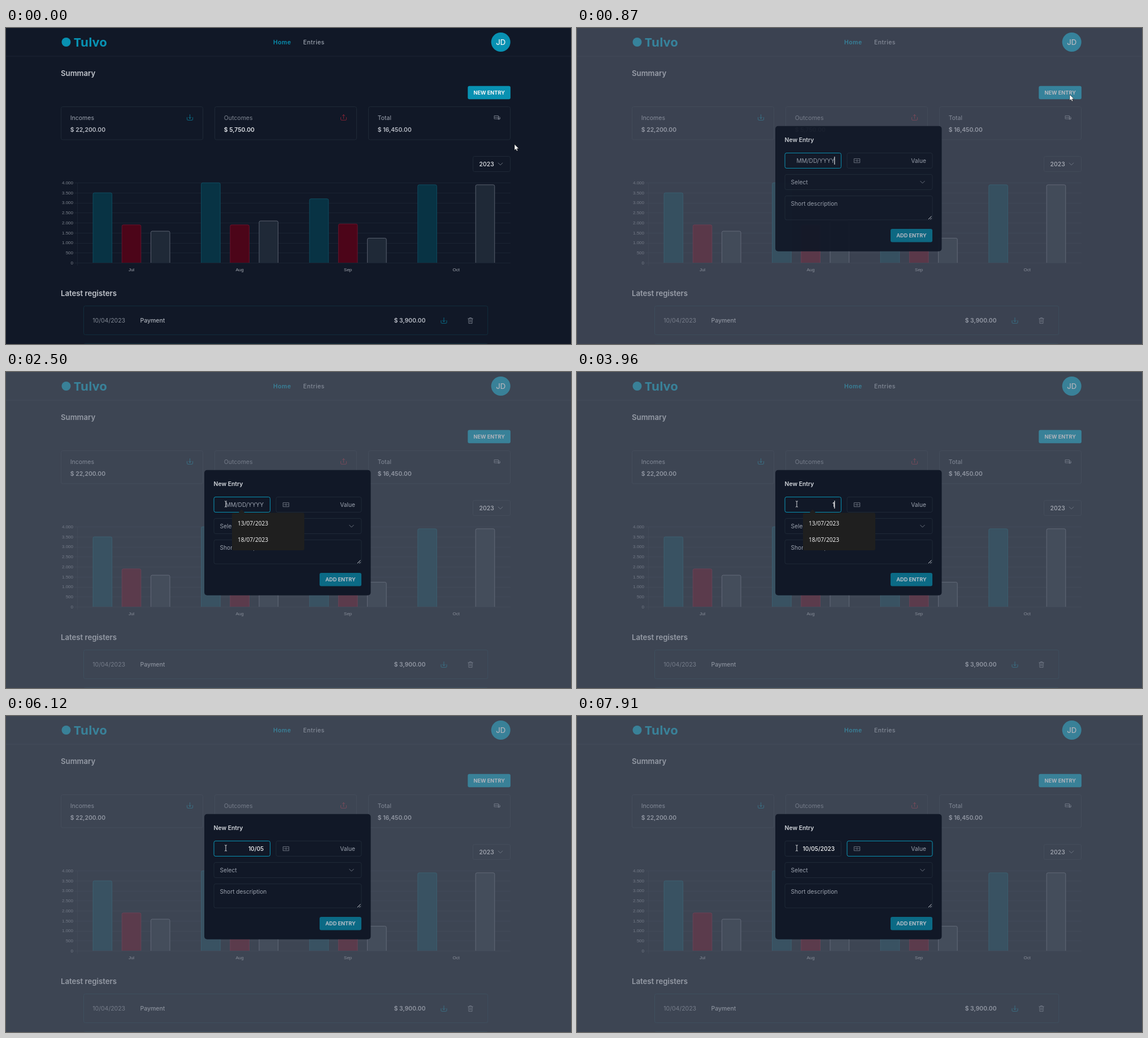
These frames come from a looping animation (1000 by 560 pixels, 8 s). An HTML page:

```html
<!DOCTYPE html>
<html lang="en">
<head>
<meta charset="utf-8">
<title>Finance dashboard</title>
<style>
  html, body { margin: 0; width: 100%; height: 100%; overflow: hidden; background: #111827; }
  svg { display: block; width: 100%; height: 100%; }
  text { font: 400 10.5px Inter, sans-serif; fill: #9ca3af; white-space: pre; }
  .medium { font-weight: 500; }
  .strong { font-weight: 600; font-size: 10.4px; fill: #b9bdc6; }
  .heading { font-weight: 600; font-size: 13.2px; fill: #c0c4cb; }
  .brand { font: 700 22px "Noto Sans", sans-serif; fill: #0891b2; }
  .nav { font-size: 10.4px; letter-spacing: .5px; font-weight: 500; }
  .active { font-weight: 600; fill: #0891b2; }
  .button { font-weight: 700; font-size: 9.2px; fill: #f3f4f6; }
  .initials { font-weight: 500; font-size: 13.2px; fill: #f3f4f6; }
  .field { font-size: 10.2px; }
  .axis { font: 8px "Liberation Sans", Arial, sans-serif; fill: #7b818c; }
  .month { fill: #a4a9b2; }
  .option { font: 10.2px "Noto Sans", sans-serif; fill: #f0f0f0; }
  .end { text-anchor: end; }
  .middle { text-anchor: middle; }
  .box { fill: none; stroke: #1f2937; }
  .row { fill: none; stroke: #122e3d; }
  .icon { fill: none; stroke: #8b929e; stroke-width: .75; stroke-linecap: round; stroke-linejoin: round; }
  .cyan { stroke: #0887a6; }
  .red { stroke: #a32638; }
  .focus { fill: none; stroke: #0891b2; }
</style>
</head>
<body>
<svg id="stage" viewBox="0 0 1000 560"></svg>
<script>
const LOOP = 8000;
const stage = document.getElementById('stage');

const text = (x, y, str, cls = '', attrs = '') =>
  `<text x="${x}" y="${y}" class="${cls}" ${attrs}>${str}</text>`;
const box = (x, y, w, h, attrs = 'class="box"') =>
  `<rect x="${x}" y="${y}" width="${w}" height="${h}" rx="3" ${attrs}/>`;
const icon = (x, y, d, cls = '') =>
  `<path transform="translate(${x} ${y})" class="icon ${cls}" d="${d}"/>`;
const line = (x1, y1, x2, y2, color) =>
  `<path d="M${x1} ${y1}L${x2} ${y2}" stroke="${color}"/>`;

const TRAY = 'M-5 0v3.3q0 1.5 1.5 1.5h7q1.5 0 1.5 -1.5v-3.3';
const DOWN = TRAY + 'M0 -5v7m-2.3 -2.3l2.3 2.3 2.3 -2.3';
const UP = TRAY + 'M0 2v-7m-2.3 2.3l2.3 -2.3 2.3 2.3';
const TRASH = 'M-4.2 -3.5h8.4M-1.5 -3.5v-1.5h3v1.5M-3.4 -3.5l.4 8.5h6l.4 -8.5M-1.1 -1.3v4M1.1 -1.3v4';
const CHEVRON = 'M-3.8 -1.9l3.8 3.8 3.8 -3.8';
const NOTE = 'M-5 -3.5h10v7h-10zM-1.3 0a1.3 1.3 0 1 0 2.6 0a1.3 1.3 0 1 0 -2.6 0M-3.4 -.4v.8M3.4 -.4v.8';
const COINS = 'M-5 -3h7v5.5h-7zM-5 -.2h7M2 -.8h1.5q1.5 0 1.5 1.6v1.7h-3M1.6 2.6a1.1 1.1 0 1 0 2.2 0a1.1 1.1 0 1 0 -2.2 0';

function card(x, label, amount, symbol, color, bright) {
  return box(x, 139.5, 251, 58.5) +
    text(x + 16.3, 162.5, label, '', bright ? 'style="fill:#7f8692"' : '') +
    text(x + 16.3, 183.5, amount, 'strong', bright ? 'style="fill:#dfe2e7"' : '') +
    icon(x + 228, 158.5, symbol, color);
}

function chart() {
  const yOf = value => 416 - value * 0.0355;
  let out = line(126.5, 274, 126.5, 421, '#1a2332');
  for (let value = 0; value <= 4000; value += 500) {
    const y = yOf(value);
    const label = value < 1000 ? value : (value / 1000).toFixed(3);
    out += line(121, Math.round(y) + .5, 893, Math.round(y) + .5, '#1a2332') +
      text(119, y + 2.9, label, 'axis end');
  }
  const colors = [['#083344', '#11566a'], ['#4c0519', '#741731'], ['#1f2937', '#6b7280']];
  const months = {
    Jul: [3500, 1900, 1585], Aug: [4000, 1900, 2095],
    Sep: [3200, 1945, 1235], Oct: [3900, 0, 3900]
  };
  Object.entries(months).forEach(([month, values], i) => {
    const left = 154 + i * 191.6;
    values.forEach((value, j) => {
      if (!value) return;
      const top = yOf(value) + .3;
      const [fill, stroke] = colors[j];
      out += `<path d="M${left + j * 51.2} 416V${top + 2.5}q0 -2.5 2.5 -2.5h28.6q2.5 0 2.5 2.5V416"
        fill="${fill}" stroke="${stroke}" stroke-width=".8"/>`;
    });
    out += text(left + 68, 430.5, month, 'axis month middle');
  });
  return out;
}

const page = `
  <rect width="1000" height="560" fill="#111827"/>
  ${line(0, 50, 1000, 50, '#1c2534')}
  <circle cx="106.5" cy="25" r="8" fill="#0891b2"/>
  ${text(120, 33, 'Tulvo', 'brand')}
  ${text(473, 29, 'Home', 'nav active')}
  ${text(526, 29, 'Entries', 'nav')}
  <circle cx="875.7" cy="25" r="17" fill="#0891b2"/>
  ${text(875.7, 29.8, 'JD', 'initials middle')}
  ${text(97, 85, 'Summary', 'heading')}
  ${box(817.3, 102.7, 75.6, 23.5, 'fill="#0891b2"')}
  ${text(855.2, 118, 'NEW ENTRY', 'button middle')}
  ${card(97.5, 'Incomes', '$ 22,200.00', DOWN, 'cyan')}
  ${card(369.5, 'Outcomes', '$ 5,750.00', UP, 'red', true)}
  ${card(641.5, 'Total', '$ 16,450.00', COINS)}
  ${box(826.5, 227.5, 66, 27)}
  ${text(837.5, 244.7, '2023', 'medium', 'style="fill:#e5e7eb"')}
  ${icon(875, 241, CHEVRON)}
  ${chart()}
  ${text(97, 475, 'Latest registers', 'heading')}
  ${box(137.5, 492.6, 715.2, 51, 'class="row"')}
  ${text(153.3, 522, '10/04/2023', '', 'style="fill:#828995"')}
  ${text(237.5, 522, 'Payment', 'medium', 'style="fill:#acb1ba"')}
  ${text(742.5, 522, '$ 3,900.00', 'strong end')}
  ${icon(775, 518.5, DOWN, 'cyan')}
  ${icon(822, 518.5, TRASH)}
  ${box(137.5, 559.3, 715.2, 51, 'class="row"')}`;

const modal = `
  <rect x="351" y="173.7" width="294.5" height="222" rx="5" fill="#111827"/>
  ${text(367.5, 201.7, 'New Entry', 'strong', 'style="fill:#d1d5db"')}
  ${box(368, 221.5, 99.5, 27)}
  ${box(478, 221.5, 151, 27)}
  ${box(368, 221.5, 99.5, 27, 'id="dateFocus" class="focus"')}
  ${box(478, 221.5, 151, 27, 'id="valueFocus" class="focus"')}
  ${text(456.2, 238.8, '', 'field end', 'id="date"')}
  <rect id="dateCaret" x="455.3" y="228" width="1.1" height="14" fill="#fff"/>
  ${icon(495.7, 235.2, NOTE)}
  ${text(618, 238.8, 'Value', 'field end')}
  <rect id="valueCaret" x="617" y="228" width="1" height="14" fill="#fff"/>
  ${box(368, 259.5, 261, 27)}
  ${text(378.5, 276.8, 'Select', 'field')}
  ${icon(611.5, 273.2, CHEVRON)}
  ${box(368, 297.5, 261, 42.5)}
  ${text(378.5, 314.8, 'Short description', 'field')}
  <path d="M622 339l5.5 -5.5M625.3 339l2.2 -2.2" stroke="#d1d5db"/>
  ${box(555, 356, 74, 23.5, 'fill="#0b6a85"')}
  ${text(592, 371, 'ADD ENTRY', 'button middle', 'style="fill:#b6bec8"')}
  <g id="options">
    <path d="M403 249.5h8.5l5.5 -6 5.5 6h2.5H525q3 0 3 3V313q0 3 -3 3H403q-3 0 -3 -3v-60.5q0 -3 3 -3z" fill="#1f1f1f"/>
    ${text(410, 271.5, '13/07/2023', 'option')}
    ${text(410, 301, '18/07/2023', 'option')}
  </g>`;

stage.innerHTML = `${page}
  <rect id="overlay" width="1000" height="560" fill="#6b7280"/>
  <g id="modal">${modal}</g>
  <path id="arrow" d="M0 0V10.6L2.4 8.4 4 12 5.8 11.2 4.2 7.8H7.6Z" fill="#fff" stroke="#000" stroke-width=".5"/>
  <path id="beam" d="M-2 -5.2Q0 -5.2 0 -4.2Q0 -5.2 2 -5.2M0 -4.5V4.5M-2 5.2Q0 5.2 0 4.2Q0 5.2 2 5.2" fill="none" stroke="#d6d8dc"/>`;

const ui = {};
stage.querySelectorAll('[id]').forEach(node => ui[node.id] = node);

// Progress that advances in equal jumps, the first at `start` and the last at `end`.
function steps(t, start, end, count) {
  if (t < start) return 0;
  return Math.min(1, (Math.floor((t - start) / (end - start) * (count - 1) + 1e-6) + 1) / count);
}
const smooth = p => p * p * (3 - 2 * p);
// Last entry whose time has passed.
const at = (t, list) => list.reduce((value, [time, next]) => t >= time ? next : value, list[0][1]);

// [start, end, jumps, x, y]
const moves = [
  [60, 390, 6, 861, 107],
  [660, 660, 1, 874, 115],
  [800, 800, 1, 872, 118],
  [1260, 2010, 12, 395, 235],
  [2090, 2170, 2, 380, 229],
  [2250, 2500, 4, 389, 234]
];
const typing = [
  [0, ''], [3960, '1'], [4100, '10'], [4580, '10/0'], [5590, '10/05'],
  [6190, '10/05/2'], [6390, '10/05/20'], [6460, '10/05/202'], [6720, '10/05/2023']
];
const caret = [
  [0, 1], [1380, 0], [1910, 1], [2440, 0], [2970, 1], [3500, 0], [3960, 1],
  [5130, 0], [5590, 1], [6120, 0], [6190, 1], [7250, 0]
];

function pointer(t) {
  let x = 900, y = 206;
  for (const [start, end, count, toX, toY] of moves) {
    if (t < start) break;
    const p = start === end ? 1 : smooth(steps(t, start, end, count));
    x += (toX - x) * p;
    y += (toY - y) * p;
  }
  return [x, y];
}

const show = (node, opacity) => node.setAttribute('opacity', opacity);

function render(t) {
  show(ui.overlay, at(t, [[0, 0], [865, .47], [930, .5]]));
  show(ui.modal, at(t, [[0, 0], [865, .94], [930, .98], [1000, 1]]));

  const typed = at(t, typing);
  ui.date.textContent = typed || 'MM/DD/YYYY';
  ui.date.style.fill = typed ? '#f9fafb' : '';
  ui.date.style.fontWeight = typed ? 500 : '';
  show(ui.dateCaret, at(t, caret));
  show(ui.valueCaret, at(t, [[0, 0], [7250, 1], [7910, 0]]));

  const focus = steps(t, 7250, 7380, 2);
  show(ui.dateFocus, 1 - focus);
  show(ui.valueFocus, focus);
  show(ui.options, steps(t, 2330, 2500, 3) - steps(t, 4100, 4320, 4));

  const [x, y] = pointer(t);
  const overInput = t > 1260 && x < 467 && y > 221;
  for (const node of [ui.arrow, ui.beam]) {
    node.setAttribute('transform', `translate(${x.toFixed(1)} ${y.toFixed(1)})`);
  }
  show(ui.arrow, overInput ? 0 : 1);
  show(ui.beam, overInput ? 1 : 0);
}

const origin = performance.now();
function tick() {
  render((performance.now() - origin) % LOOP);
  requestAnimationFrame(tick);
}
render(0);
requestAnimationFrame(tick);
</script>
</body>
</html>
```
